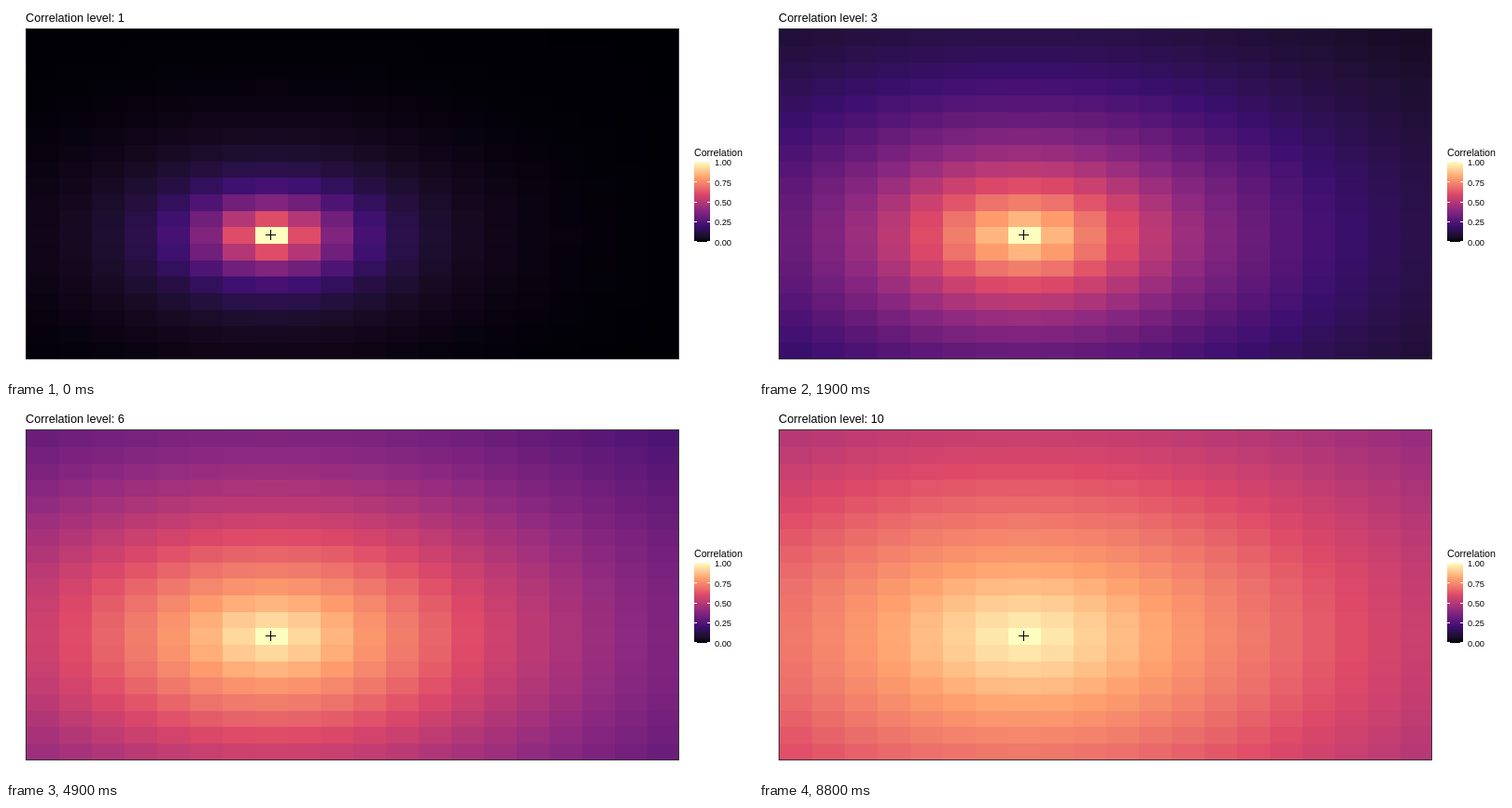
An HTML page that plays this animation: 800x400 px, repeating every 10 s.

```html
<!DOCTYPE html>
<html lang="en">
<head>
<meta charset="utf-8">
<title>Correlation level</title>
<style>
  html, body { margin: 0; width: 100%; height: 100%; overflow: hidden; background: #fff; }
  svg { display: block; }
  text { font-family: "Liberation Sans", Arial, sans-serif; fill: #000; }
</style>
</head>
<body>
<svg id="stage" width="800" height="400" viewBox="0 0 800 400"></svg>
<script>
const SIZE = 20, COL = 7, ROW = 12;      // grid and reference cell
const STEP = 100, FRAMES = 100;
const stage = document.getElementById('stage');

function add(tag, attrs, content) {
  const node = document.createElementNS('http://www.w3.org/2000/svg', tag);
  for (const key in attrs) node.setAttribute(key, attrs[key]);
  if (content) node.textContent = content;
  return stage.appendChild(node);
}

function box(x, y, width, height, fill) {
  return add('rect', { x, y, width, height, fill, 'shape-rendering': 'crispEdges' });
}

function label(x, y, size, content) {
  return add('text', { x, y, 'font-size': size }, content);
}

// Colours are mixed in CIE Lab (D65).
function toLab(hex) {
  const [r, g, b] = [1, 3, 5].map(i => {
    const v = parseInt(hex.slice(i, i + 2), 16) / 255;
    return v <= 0.04045 ? v / 12.92 : ((v + 0.055) / 1.055) ** 2.4;
  });
  const f = v => v > 0.008856 ? Math.cbrt(v) : 7.787 * v + 16 / 116;
  const x = f((0.4124 * r + 0.3576 * g + 0.1805 * b) / 0.9505);
  const y = f(0.2126 * r + 0.7152 * g + 0.0722 * b);
  const z = f((0.0193 * r + 0.1192 * g + 0.9505 * b) / 1.089);
  return [116 * y - 16, 500 * (x - y), 200 * (y - z)];
}

function toRgb([l, a, b]) {
  const f = v => v ** 3 > 0.008856 ? v ** 3 : (v - 16 / 116) / 7.787;
  const fy = (l + 16) / 116;
  const x = 0.9505 * f(fy + a / 500), y = f(fy), z = 1.089 * f(fy - b / 200);
  const channels = [
    3.2406 * x - 1.5372 * y - 0.4986 * z,
    -0.9689 * x + 1.8758 * y + 0.0415 * z,
    0.0557 * x - 0.204 * y + 1.057 * z
  ].map(v => {
    const s = v <= 0.0031308 ? 12.92 * v : 1.055 * v ** (1 / 2.4) - 0.055;
    return Math.round(255 * Math.min(1, Math.max(0, s)));
  });
  return `rgb(${channels})`;
}

const mix = (p, q, t) => p.map((v, i) => v + (q[i] - v) * t);

const ramp = ['#000004', '#3B0F70', '#8C2981', '#DE4968', '#FE9F6D', '#FCFDBF'].map(toLab);

function shade(value) {
  const pos = value * (ramp.length - 1);
  const i = Math.min(ramp.length - 2, Math.floor(pos));
  return mix(ramp[i], ramp[i + 1], pos - i);
}

const correlation = (dist, level) => Math.exp(-dist / (2 * level));

// Heat map
const edgeX = i => Math.min(720, 22 + 35 * i);
const edgeY = i => Math.min(378, Math.round(25.2 + 17.68 * i));
const cells = [];
for (let row = 0; row < SIZE; row++) {
  for (let col = 0; col < SIZE; col++) {
    const x = edgeX(col), y = edgeY(row);
    cells.push({
      dist: Math.hypot(col - COL, row - ROW),
      node: box(x, y, edgeX(col + 1) - x, edgeY(row + 1) - y)
    });
  }
}
add('rect', { x: 21.5, y: 24.5, width: 699, height: 354, fill: 'none', stroke: '#333' });
box(278, 245, 11, 1, '#000');
box(283, 240, 1, 11, '#000');
const title = label(21, 17, 12.7, 'Correlation level: 1');

// Legend
const BAR = { x: 737, y: 167, width: 17, height: 86 };
label(737, 161, 10.6, 'Correlation');
for (let i = 0; i < BAR.height; i++) {
  box(BAR.x, BAR.y + i, BAR.width, 1, toRgb(shade(1 - (i + 0.5) / BAR.height)));
}
for (let i = 0; i <= 4; i++) {
  const y = BAR.y + Math.round(i * (BAR.height - 1) / 4);
  box(BAR.x, y, 3, 1, '#fff');
  box(BAR.x + BAR.width - 3, y, 3, 1, '#fff');
  label(759, BAR.y + 4.2 + i * 21.4, 9.2, (1 - i / 4).toFixed(2));
}

// Each level is reached in a few equal steps, then held.
function stateAt(frame) {
  let level = 1;
  for (let k = 1; k <= 9; k++) {
    const end = k < 9 ? 10 * k - 1 : 88;
    const steps = k < 3 ? 3 : 2;
    const part = (frame - end + steps) / steps;
    if (part <= 0) break;
    if (part < 1) return { level: k, part };
    level = k + 1;
  }
  return { level, part: 0 };
}

function draw(frame) {
  const { level, part } = stateAt(frame);
  for (const { dist, node } of cells) {
    const from = shade(correlation(dist, level));
    const to = shade(correlation(dist, level + 1));
    node.setAttribute('fill', toRgb(mix(from, to, part)));
  }
  title.textContent = 'Correlation level: ' + (part > 0.5 ? level + 1 : level);
}

let shown = 0;
const start = performance.now();

function tick() {
  const frame = Math.floor((performance.now() - start) / STEP) % FRAMES;
  if (frame !== shown) draw(shown = frame);
  requestAnimationFrame(tick);
}

draw(0);
requestAnimationFrame(tick);
</script>
</body>
</html>
```
